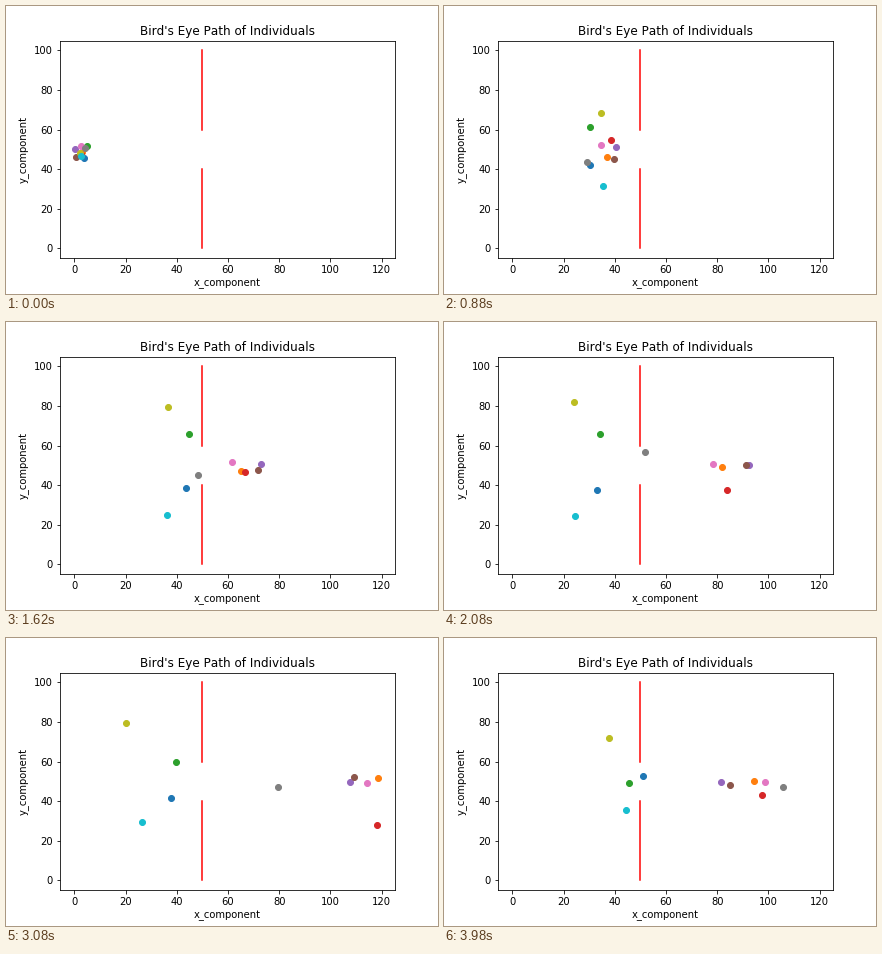
These frames come from a looping animation (432x288 px, 4 s). A matplotlib script:

```python
import numpy as np
import matplotlib.pyplot as plt
from matplotlib.animation import FuncAnimation

FRAMES = 200
INTERVAL = 20
DOOR_X, END_X = 47.4, 118.6
t = np.arange(FRAMES, dtype=float)
s = t / (FRAMES - 1)

plt.rcParams.update({"font.family": "DejaVu Sans", "font.size": 10,
                     "text.kerning_factor": 6})


def approach(x0, hit, wall, ease):
    """Walk from x0 to the wall, slowing slightly, until time hit."""
    u = t / hit
    return x0 + (wall - x0) * u + 4 * ease * u * (1 - u)


def crosser(x0, hit, x1, ease=1.2):
    """Pass the door, bounce off the far end and walk back to x1."""
    back = END_X + (x1 - END_X) * (t - hit) / (FRAMES - 1 - hit)
    return np.where(t < hit, approach(x0, hit, END_X, ease), back)


def returner(x0, hit, turn, queue=END_X):
    """Bounce off the door wall, then swing round to face it again.

    The speed after the hit is drift + swing * tanh((t - turn) / width).
    """
    drift, swing, width = -0.09, 0.51, 24

    def travel(time):
        return drift * time + swing * width * np.log(np.cosh((time - turn) / width))

    back = np.minimum(DOOR_X + travel(t) - travel(hit), queue)
    return np.where(t < hit, approach(x0, hit, DOOR_X, 0.8), back)


def sway(y0, y1, bow, wave):
    """Drift from y0 to y1 with one bow and one full wave on top."""
    return y0 + (y1 - y0) * s + bow * np.sin(np.pi * s) + wave * np.sin(2 * np.pi * s)


# This walker gets stuck in the doorway for a moment.
stops = [0, 44, 81, 104, 160, 199]
stuck = (np.interp(t, stops, [4.2, 29.1, 48.3, 51.8, 83, 105.7]),
         np.interp(t, stops, [50.4, 43.6, 45, 56.7, 46, 47]))

paths = [
    (returner(3.8, 74.5, 117, queue=51), sway(45.5, 52.7, -11.3, 2)),
    (crosser(3, 154.2, 94.4), sway(48.5, 50.2, -0.8, -2.2)),
    (returner(5, 76.5, 116, queue=45.6), sway(51.6, 49.1, 15.7, 0)),
    (crosser(2.6, 154.3, 97.5, ease=3.3), sway(47.8, 43, -6.3, 12)),
    (crosser(0.3, 135.5, 81.5, ease=1.9), sway(50.1, 49.4, 0.7, 0.6)),
    (crosser(0.7, 136.5, 85), sway(46.1, 48.1, 2.6, -3)),
    (crosser(2.6, 160, 98.7, ease=0.2), sway(51.6, 49.5, 0.4, 1)),
    stuck,
    (returner(2, 62.5, 128), sway(48.3, 71.9, 21.6, 1.2)),
    (returner(2.5, 61.5, 121), sway(46.7, 35.5, -16.9, -2.2)),
]

fig = plt.figure(figsize=(6, 4), dpi=72, facecolor="white")
ax = fig.add_axes([0.125, 0.125, 0.775, 0.755])
ax.set(xlim=(-5.66, 125.17), ylim=(-5, 105),
       xlabel="x_component", ylabel="y_component",
       title="Bird's Eye Path of Individuals")
for low, high in [(0, 40), (60, 100)]:
    ax.plot([50, 50], [low, high], color="red", lw=1.5)
dots = [ax.plot([], [], "o", color=f"C{i}", ms=6)[0] for i in range(len(paths))]


def update(frame):
    for dot, (x, y) in zip(dots, paths):
        dot.set_data([x[frame]], [y[frame]])
    return dots


anim = FuncAnimation(fig, update, frames=FRAMES, interval=INTERVAL,
                     repeat=True, repeat_delay=0, blit=False)
plt.show()
```
